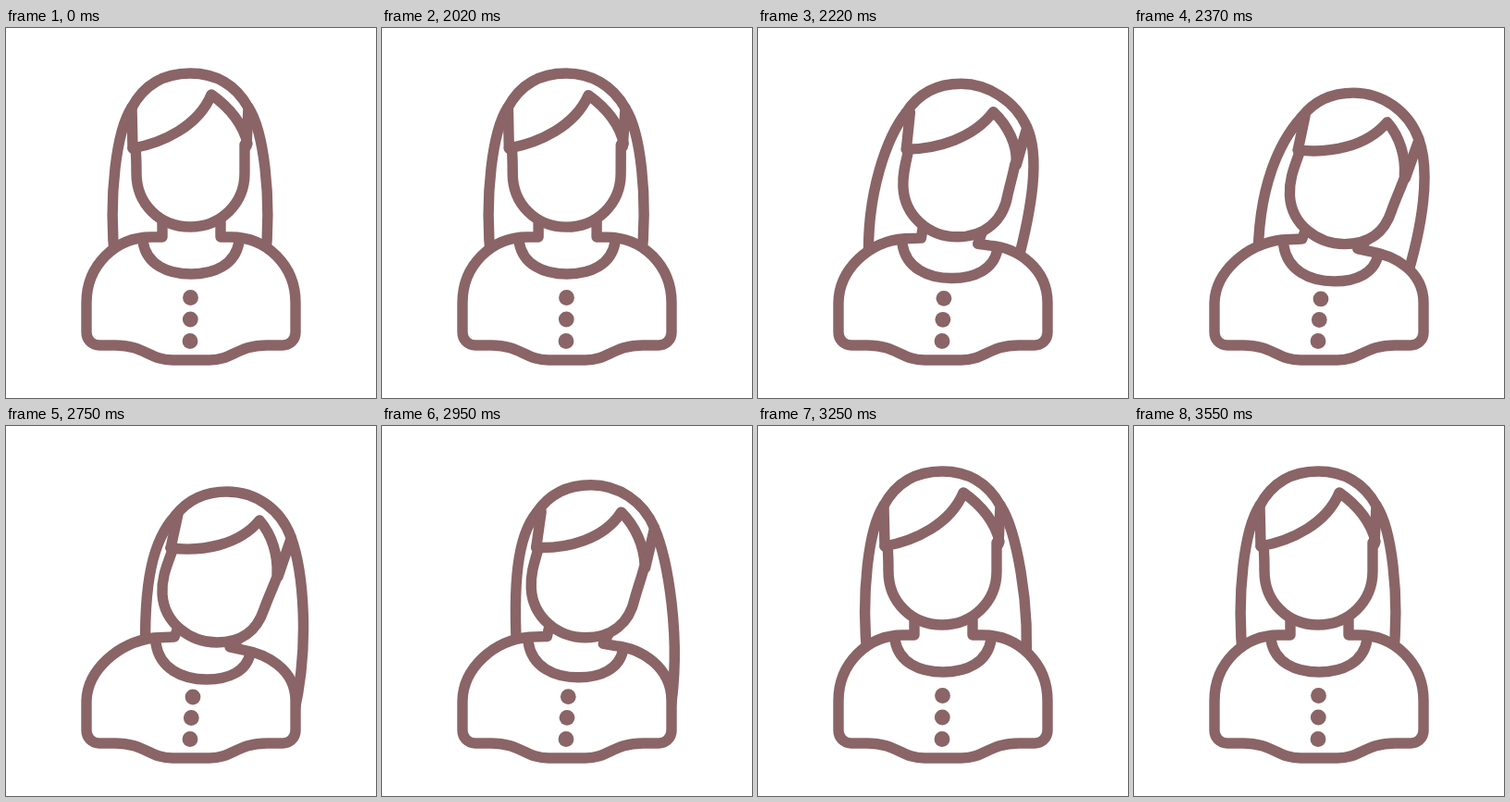
Animation of 400x400 px, one loop 3570 ms. Source, as an HTML page:

```html
<!DOCTYPE html>
<html>
<head>
<meta charset="utf-8">
<style>
  html, body { margin: 0; width: 100%; height: 100%; overflow: hidden; background: #fff; }
  svg { display: block; width: 100vw; height: 100vh; }
  path { fill: none; stroke: #8a6466; stroke-width: 11.4; stroke-linecap: round; stroke-linejoin: round; }
  .solid { fill: #fff; }
  circle { fill: #8a6466; }
</style>
</head>
<body>
<svg id="stage" viewBox="0 0 400 400"></svg>
<script>
const LOOP = 3570;
const stage = document.getElementById('stage');

const torso = 'L87 329C87 337 93 343 101 343L118 343C150 343 155 359 180 359L220 359' +
  'C245 359 250 343 282 343L299 343C307 343 313 337 313 329L313 297';

// Each part: upright pose, tilted pose, and which weights drive it.
const parts = [
  { from: 'M136 86C120 110 110 180 118 255',
    to: 'M183 97C160 122 148 165 151 255',
    weights: p => [p.crown, p.crown, mix(p.left, p.crown, .25), p.left] },
  { from: 'M262 86C278 110 288 180 280 255',
    to: 'M308 120C321 155 329 235 311 312',
    weights: p => [p.side, p.side, mix(p.right, p.side, .34), p.right] },
  { from: 'M169 206L169 226L157 226C118 226 87 257 87 297' + torso + 'C313 257 282 226 243 226L232 226L232 206',
    to: 'M186 218L182 228L160 229C121 234 88 264 87 297' + torso + 'C313 262 280 246 256 242L242 239L250 232',
    solid: true },
  { from: 'M148 231C152 256 175 266 200 266C225 266 248 256 252 231',
    to: 'M162 235C166 262 190 274 217 274C241 274 260 265 264 246' },
  { from: 'M140 130C141 140 141 148 141 157C141 190 166 215 199 215C232 215 258 190 258 157C258 147 258 138 258 126',
    to: 'M180 134C173 153 168 165 169 182C171 213 199 234 228 234C255 234 271 222 279 198C284 184 289 174 293 163',
    solid: true },
  { from: 'M137 130C170 124 208 106 222 72C242 86 257 105 261 125',
    to: 'M178 132C212 136 252 129 274 102C288 118 294 140 293 160',
    weights: p => [p.head, p.head, p.head, p.side, p.side, p.side, p.head] },
  { from: 'M136 86L137 130', to: 'M186 95L178 132' },
  { from: 'M262 86L260 128', to: 'M308 122L294 163', weights: p => [p.side, p.head] },
  { from: 'M136 86C150 60 172 49 199 49C226 49 248 61 262 86',
    to: 'M183 97C197 79 217 71 239 71C270 71 297 90 308 120',
    weights: p => [p.crown, p.crown, p.crown, p.crown, p.crown, p.side, p.side] }
];
const buttons = [[199.5, 291.5, 2.5, 1.5], [199.3, 315, 1, .5], [199, 338.5, 0, 0]];

function mix(a, b, k) { return a + (b - a) * k; }

function add(tag, attrs) {
  const el = document.createElementNS('http://www.w3.org/2000/svg', tag);
  for (const name in attrs) el.setAttribute(name, attrs[name]);
  return stage.appendChild(el);
}

// Eased value through [time, value] keys.
function track(t, keys) {
  if (t <= keys[0][0]) return keys[0][1];
  for (let i = 1; i < keys.length; i++) {
    const [t0, v0] = keys[i - 1], [t1, v1] = keys[i];
    if (t < t1) {
      const u = (t - t0) / (t1 - t0);
      return mix(v0, v1, u * u * (3 - 2 * u));
    }
  }
  return keys[keys.length - 1][1];
}

const tilt = (t, go, back) => track(t, [[go, 0], [go + 405, 1], [back, 1], [back + 405, 0]]);
const swing = (t, go, back) =>
  track(t, [[go, 0], [2600, 1.05], [2760, 1], [back, 1], [back + 480, -.04], [3560, 0]]);

for (const part of parts) {
  part.el = add('path', part.solid ? { class: 'solid' } : {});
  part.target = part.to.match(/[\d.]+/g).map(Number);
}
const dots = buttons.map(() => add('circle', { r: 8.4 }));

function draw(t) {
  const pose = {
    head: tilt(t, 2000, 2811),
    crown: tilt(t, 2015, 2795),
    side: tilt(t, 1985, 2805),
    left: swing(t, 2160, 2840),
    right: swing(t, 2205, 2950)
  };
  for (const { el, from, target, weights } of parts) {
    const w = weights && weights(pose);
    let i = 0;
    el.setAttribute('d', from.replace(/[\d.]+/g, n => {
      const k = w ? w[i >> 1] : pose.head;
      return mix(+n, target[i++], k).toFixed(2);
    }));
  }
  buttons.forEach(([x, y, dx, dy], i) => {
    dots[i].setAttribute('cx', x + dx * pose.head);
    dots[i].setAttribute('cy', y + dy * pose.head);
  });
}

const start = performance.now();
function tick() {
  draw((performance.now() - start) % LOOP);
  requestAnimationFrame(tick);
}
tick();
</script>
</body>
</html>
```
